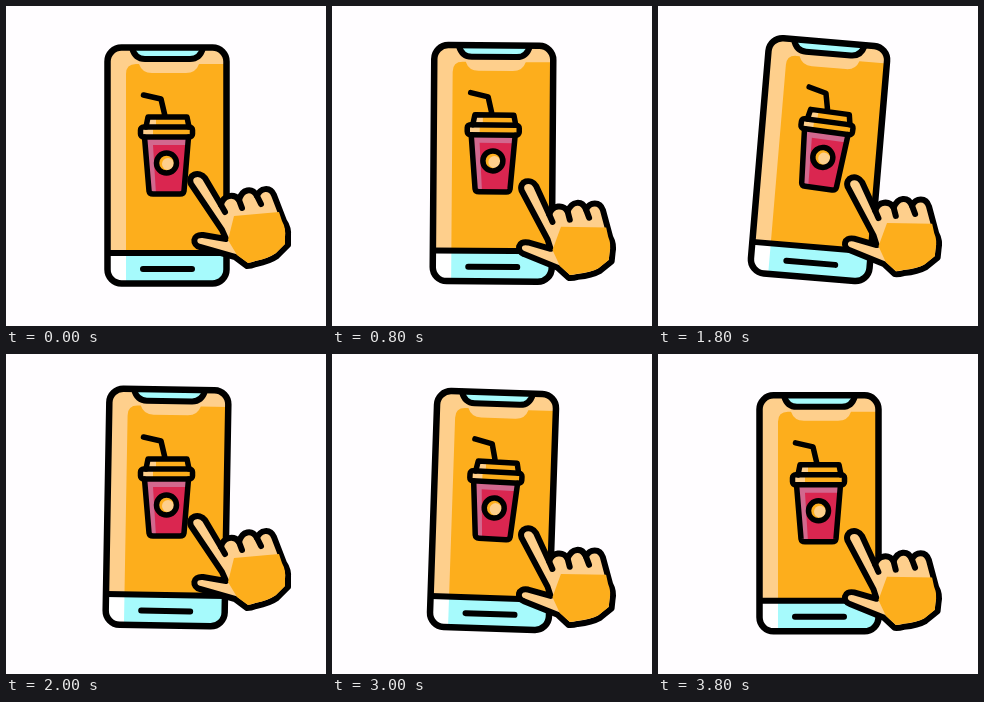
Animation of 320 by 320 pixels, one loop 4 s. Source, as an HTML page:

```html
<!DOCTYPE html>
<html lang="en">
<head>
<meta charset="utf-8">
<title>Order a drink</title>
<style>
  html, body { margin: 0; width: 100%; height: 100%; overflow: hidden; background: #fffdff; }
  svg { display: block; width: 100vw; height: 100vh; }
  .line { fill: none; stroke: #000; stroke-width: 6; stroke-linecap: round; stroke-linejoin: round; }
  .orange { fill: #fdae1c; }
  .peach { fill: #fecf8c; }
  .cyan { fill: #a6fafc; }
</style>
</head>
<body>
<svg viewBox="0 0 320 320">
  <g id="phone">
    <rect class="peach" x="101.5" y="41.5" width="119" height="236" rx="14"/>
    <path class="orange" d="M120 247V68Q120 58 130 58H133Q136 67 146 67H180Q190 67 193 58H220.5V247Z"/>
    <path fill="#fff" d="M101.5 247H220.5V264Q220.5 277.5 207 277.5H115Q101.5 277.5 101.5 264Z"/>
    <path class="cyan" d="M120 247H220.5V264Q220.5 277.5 207 277.5H120Z"/>
    <path class="cyan" d="M126 42Q129 53 139 53H184Q194 53 197 42Z"/>
    <path class="line" d="M126 42Q129 53 139 53H184Q194 53 197 42M102 247H220M137 263H186"/>
    <rect class="line" x="101.5" y="41.5" width="119" height="236" rx="14" style="stroke-width:6.5"/>
  </g>
  <g id="cup">
    <path fill="#da2650" d="M138.5 131L143 185Q143.5 188 147 188H174Q177.500 188 178 185L182.5 131Z"/>
    <path fill="#d2688e" d="M138.5 131H182.5L182 139H147L150 188H147Q143.5 188 143 185Z"/>
    <path class="orange" d="M140 122L142 111H181L183 122Z"/>
    <rect class="orange" x="134.5" y="121" width="52" height="10" rx="3"/>
    <path class="peach" d="M141 120L143 112H150V120ZM137 122H147V130H137Z"/>
    <circle class="orange" cx="160.5" cy="157" r="10"/>
    <circle class="peach" cx="162" cy="158" r="6"/>
    <g class="line" style="stroke-width:5.5">
      <path d="M138.5 131L143 185Q143.5 188 147 188H174Q177.500 188 178 185L182.5 131"/>
      <path d="M140 121L142 111H181L183 121M137.5 89L155 93L159 110"/>
      <rect x="134.5" y="121" width="52" height="10" rx="3"/>
      <circle cx="160.5" cy="157" r="10"/>
    </g>
  </g>
  <g id="hand">
    <path id="skin" class="peach line" style="fill:#fecf8c" d="M220 233L197 229C186 228 186 239 194 241L229 251L241 260Q245 260 250 258Q264 255 271 250L282 239V231Q283 222 278 215L268 189C264 180 254 182 251 190C246 181 236 183 233 194C228 187 217 189 215 199L199 172C193 164 181 169 185 178L216 224Z"/>
    <path class="orange" d="M228 210L273 206L276 215Q280 222 279 231V238L270 247Q263 252 249 255L242 257L231 249L222 234Z"/>
    <path class="line" d="M215 199L219 206M233 194L236 202M251 190L255 198"/>
  </g>
</svg>
<script>
  const STEP = 200, STEPS = 20;
  const clamp = (v, lo, hi) => Math.min(hi, Math.max(lo, v));

  // The phone leans over, then rocks back and forth as it settles
  function tiltAt(i) {
    if (i < 7) return 4.8 * (i / 6) ** 6;
    return i % 2 ? 5.8 * (19 - i) / 12 : Math.max((i - 20) / 6, 5.2 - 1.05 * (i - 6));
  }

  // Two taps per loop: 1 is raised, -1 is pressed
  function tapAt(i) {
    const gap = Math.abs((i / 10 + .35) % 1 - .5);
    return clamp(-1.2 * Math.cos(Math.PI * Math.min(1, gap / .3)), -1, 1);
  }

  const place = (id, x, y, px, py, angle, scale = 1) =>
    document.getElementById(id).setAttribute("transform",
      `translate(${px + x} ${py + y}) rotate(${angle}) scale(${scale}) translate(${-px} ${-py})`);

  function draw(now) {
    const i = Math.floor(now / STEP) % STEPS;
    const y = -3 * (1 - Math.cos(2 * Math.PI * i / STEPS));
    const tilt = tiltAt(i), tap = tapAt(i);
    const sway = 2.5 * Math.exp(-(((i - 6.5) / 1.3) ** 2));
    place("phone", 0, y, 161, 159.5, tilt);
    place("cup", 0, y, 160.5, 189, 1.6 * tilt * Math.max(0, tap), 1 - .09 * Math.max(0, -tap));
    place("hand", sway - 1.5 * Math.abs(tap), 9 * tap + y - sway / 2, 192, 235, 6 * tap + sway * .7);
    requestAnimationFrame(draw);
  }
  draw(performance.now());
</script>
</body>
</html>
```
